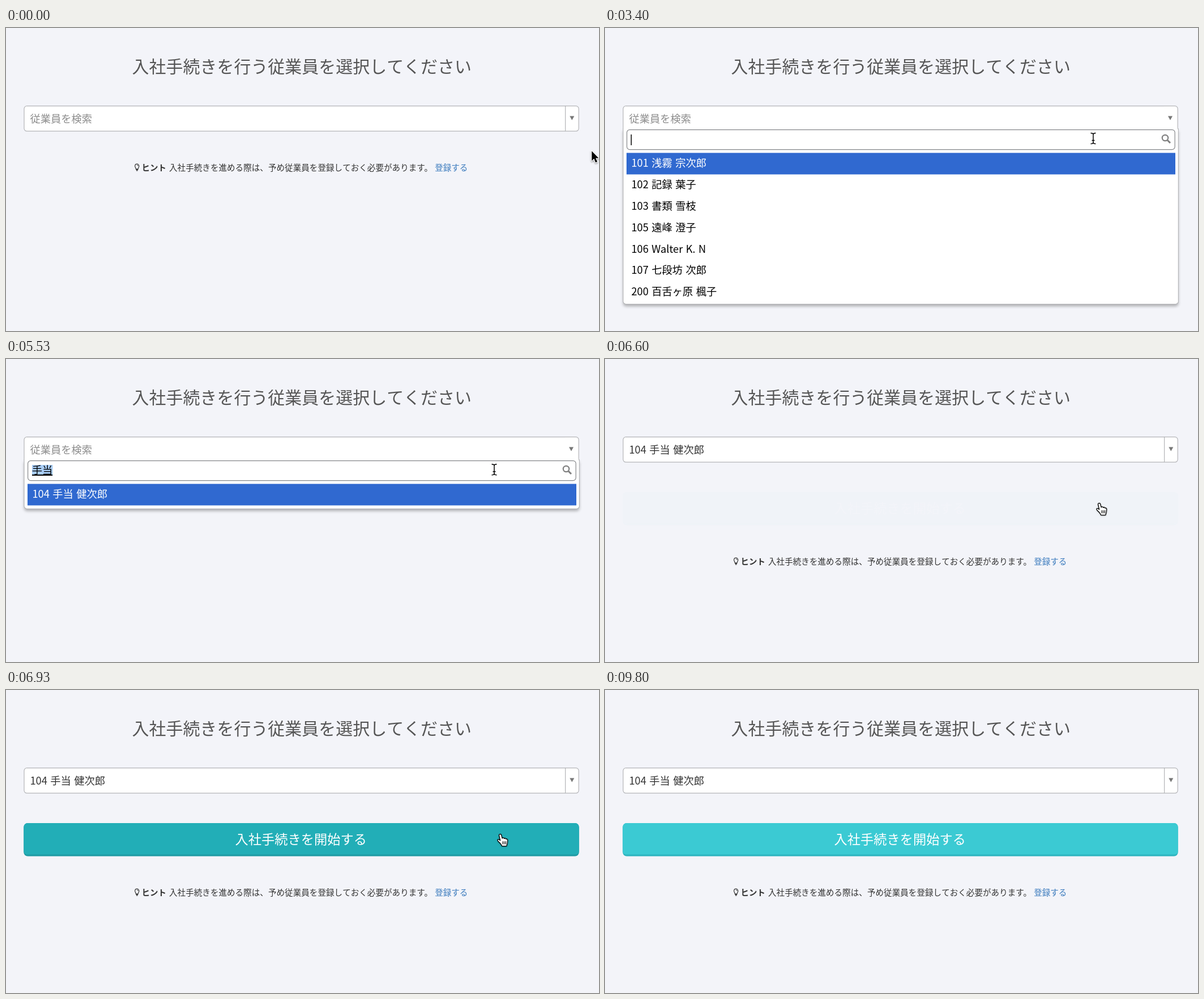
These frames come from a looping animation (1047 px wide and 535 px high, 9940 ms). An HTML page with a canvas:

```html
<!DOCTYPE html>
<html lang="ja">
<head>
<meta charset="utf-8">
<title>従業員の選択</title>
<style>
html, body { margin: 0; width: 100%; height: 100%; overflow: hidden; background: #f3f4f9; }
canvas { display: block; width: 1047px; height: 535px; }
</style>
</head>
<body>
<canvas id="stage"></canvas>
<script>
const W = 1047, H = 535, LOOP = 9940, STEP = 1000 / 15;
const FONT = '"Noto Sans CJK JP", "Noto Sans CJK", "Noto Sans", sans-serif';
const BG = [243, 244, 249];

// Key moments in ms
const OPEN = 1400, TYPE = 3800, CONVERT = 4400, FILTER = 4600, PICK = 6470;

const PEOPLE = ['101 浅霧 宗次郎', '102 記録 葉子', '103 書類 雪枝', '105 遠峰 澄子',
  '106 Walter K. N', '107 七段坊 次郎', '200 百舌ヶ原 楓子'];
const CHOSEN = '104 手当 健次郎';
const TYPED = [[TYPE, 't'], [3930, 'て'], [4060, 'てあ'], [4130, 'てあt'], [4200, 'てあて']];

// Pointer path: time, x, y
const PATH = [[0, 1034, 217], [70, 1034, 217], [470, 1000, 164], [790, 1000, 164],
  [800, 1000, 161], [1800, 1000, 161], [2670, 862, 195], [5530, 862, 195],
  [5870, 872, 275], [6130, 873, 256], [8670, 873, 256], [9400, 1054, 226], [LOOP, 1054, 226]];

const ARROW = new Path2D('M0 0V17.2L4 13.6L6.8 20.2L9.8 18.9L7 12.5H12.2Z');
const HAND = new Path2D('M-2.6 .8C-3-1.8 1-2.4 1.8 .2L3.3 6C4.6 4.4 6.8 4.9 7 6.6' +
  'C8.4 5.4 10.3 6.1 10.5 7.6C12 6.8 13.5 7.8 13.4 9.8L13 14.6L11.4 20.3H2.9' +
  'C1.6 16.6-1.6 14.2-4.6 11C-6.4 8.9-4.6 7.2-2.6 8.3L-.4 10Z');
const BEAM = new Path2D('M-4.5-9.5C-2-9.5 0-9 0-7V7C0 9-2 9.5-4.5 9.5' +
  'M4.5-9.5C2-9.5 0-9 0-7M0 7C0 9 2 9.5 4.5 9.5M-2.5 3.5H2.5');
const BULB = new Path2D('M-2 3.2C-2 1.4-4-.1-4-2.2C-4-7.4 4-7.4 4-2.2C4-.1 2 1.4 2 3.2Z' +
  'M-2 4.6H2M-1.4 6.1H1.4M.4-4.1C1.5-4 2-3.3 2.1-2.5');

const canvas = document.getElementById('stage');
const ctx = canvas.getContext('2d');
const dpr = window.devicePixelRatio || 1;
canvas.width = W * dpr;
canvas.height = H * dpr;

const clamp = v => Math.max(0, Math.min(1, v));
const ramp = (t, from, to) => clamp((t - from) / (to - from));
const ease = p => p * p * (3 - 2 * p);
const mix = (a, b, p) => a.map((v, i) => Math.round(v + (b[i] - v) * p));
const rgb = c => `rgb(${c})`;

// y is the middle of the line
function text(str, x, y, size, color, weight = 500) {
  ctx.font = `${weight} ${size}px ${FONT}`;
  ctx.wordSpacing = size > 16 ? '1.3px' : '0px';
  ctx.fillStyle = color;
  ctx.fillText(str, x, y + size * 0.375);
  return ctx.measureText(str).width;
}

function box(x, y, w, h, r, fill, stroke) {
  ctx.beginPath();
  ctx.roundRect(x, y, w, h, r);
  if (fill) {
    ctx.fillStyle = fill;
    ctx.fill();
  }
  if (stroke) {
    ctx.strokeStyle = stroke;
    ctx.lineWidth = 1.2;
    ctx.stroke();
  }
}

function rect(x, y, w, h, color) {
  ctx.fillStyle = color;
  ctx.fillRect(x, y, w, h);
}

function shadow(color, blur, dy) {
  ctx.shadowColor = color;
  ctx.shadowBlur = blur * dpr;
  ctx.shadowOffsetY = dy * dpr;
}

function field(label, color, open) {
  box(32, 137.7, 979.2, 44.5, 5, '#fff', '#b4b5b8');
  rect(35, 138.4, 952, 1, '#eeeef0');
  if (!open) rect(987, 138, 1.2, 44, '#b4b5b8');
  const x = open ? 998 : 999.3;
  ctx.beginPath();
  ctx.moveTo(x - 4, 155.5);
  ctx.lineTo(x + 4, 155.5);
  ctx.lineTo(x, 162.8);
  ctx.fillStyle = '#777';
  ctx.fill();
  text(label, 42.4, 160, 18.3, color);
}

function hint(y) {
  ctx.save();
  ctx.translate(231.3, y);
  ctx.scale(0.9, 0.95);
  ctx.strokeStyle = '#333';
  ctx.lineWidth = 1.3;
  ctx.stroke(BULB);
  ctx.restore();
  text('ヒント', 239.4, y + 0.4, 14.5, '#333', 700);
  text('入社手続きを進める際は、予め従業員を登録しておく必要があります。', 288, y + 0.4, 14.58, '#333');
  text('登録する', 757.2, y + 0.4, 14.5, '#3a7abd');
}

// Blinks once a second with soft edges
function caretAlpha(t) {
  const p = (t - OPEN) % 1000;
  return p < 870 ? 1 - ramp(p, 470, 600) : ramp(p, 870, 990);
}

function query(t) {
  if (t >= CONVERT) {
    rect(46, 187, 36.5, 19, '#a9cdf6');
    text('手当', 45.8, 196.5, 18.3, '#000');
    rect(46, 204, 36, 2, '#000');
    return;
  }
  let x = 45.6;
  const now = TYPED.filter(k => t >= k[0]).pop();
  if (now) {
    const w = text(now[1], 45.8, 196.5, 18.3, '#000');
    rect(46, 205, w, 1, '#000');
    x += w;
  }
  ctx.globalAlpha = now ? 1 : caretAlpha(t);
  rect(x, 188, 1.5, 19, '#000');
  ctx.globalAlpha = 1;
}

function dropdown(t) {
  const rows = t >= FILTER ? [CHOSEN] : PEOPLE;
  const bottom = rows.length > 1 ? 487.5 : 264.5;
  shadow('rgba(0,0,0,.28)', 5, 4);
  box(32, 178, 980.4, bottom - 178, [0, 0, 5, 5], '#fff');
  shadow('transparent', 0, 0);
  box(32, 178, 980.4, bottom - 178, [0, 0, 5, 5], null, '#b6b7ba');
  rect(32.7, 176.5, 978, 3, '#fff');

  box(38.6, 179.6, 967.6, 35, 5, '#fff', '#85878a');
  ctx.strokeStyle = '#808080';
  ctx.lineWidth = 2.2;
  ctx.beginPath();
  ctx.arc(989, 194, 5.2, 0, 7);
  ctx.stroke();
  ctx.lineWidth = 3;
  ctx.beginPath();
  ctx.moveTo(993, 198);
  ctx.lineTo(998, 203);
  ctx.stroke();
  query(t);

  rect(38, 220.5, 969, 38, '#3069d0');
  rows.forEach((name, i) => text(name, 46.4, 238.6 + i * 37.8, 18.3, i ? '#000' : '#fff'));
}

function button(t, leave) {
  const shown = ramp(t, 6600, 6900);
  if (!shown) return;
  const face = mix([34, 174, 183], [59, 202, 211], leave);
  const edge = mix([30, 155, 164], [45, 180, 191], leave);
  box(31.3, 235, 980.4, 58.5, 7, rgb(mix(BG, edge, shown)));
  box(31.3, 235, 980.4, 55.5, [7, 7, 6, 6], rgb(mix(BG, face, shown)));
  text('入社手続きを開始する', 404.6, 263.6, 23.25, rgb(mix(BG, [255, 255, 255], shown)));
}

function pointerAt(t) {
  const i = PATH.findIndex(k => t < k[0]);
  const [t0, x0, y0] = PATH[i - 1], [t1, x1, y1] = PATH[i];
  const p = ease(ramp(t, t0, t1));
  return [x0 + (x1 - x0) * p, y0 + (y1 - y0) * p];
}

function pointerKind(t, x, y) {
  if (t >= PICK) return x < 1012 && y > 235 && y < 294 ? 'hand' : 'arrow';
  if (t < OPEN || x > 1006) return 'arrow';
  if (y > 180 && y < 215) return 'beam';
  return y > 220 && y < 259 ? 'hand' : 'arrow';
}

function pointer(t) {
  const [x, y] = pointerAt(t);
  const kind = pointerKind(t, x, y);
  ctx.save();
  ctx.translate(x, y);
  ctx.lineJoin = 'round';
  if (kind === 'beam') {
    ctx.strokeStyle = '#fff';
    ctx.lineWidth = 3;
    ctx.stroke(BEAM);
    ctx.strokeStyle = '#000';
    ctx.lineWidth = 1.5;
    ctx.stroke(BEAM);
  } else if (kind === 'hand') {
    ctx.scale(0.95, 0.97);
    shadow('rgba(0,0,0,.35)', 3, 1);
    ctx.fillStyle = '#fff';
    ctx.fill(HAND);
    shadow('transparent', 0, 0);
    ctx.strokeStyle = '#000';
    ctx.lineWidth = 1.4;
    ctx.stroke(HAND);
    for (const lx of [3.8, 6.6, 9.4]) rect(lx, 11.5, 1.2, 5.5, '#000');
  } else {
    ctx.translate(0.2, 0.2);
    shadow('rgba(0,0,0,.4)', 3, 1.5);
    ctx.strokeStyle = '#fff';
    ctx.lineWidth = 2.4;
    ctx.stroke(ARROW);
    shadow('transparent', 0, 0);
    ctx.fillStyle = '#000';
    ctx.fill(ARROW);
  }
  ctx.restore();
}

function draw(t) {
  ctx.setTransform(dpr, 0, 0, dpr, 0, 0);
  rect(0, 0, W, H, rgb(BG));
  text('入社手続きを行う従業員を選択してください', 222.6, 67.8, 29.97, '#555', 400);

  const picked = t >= PICK, open = t >= OPEN && !picked;
  if (picked) field(CHOSEN, '#333', false);
  else field('従業員を検索', '#8c8c8c', open);

  if (open) dropdown(t);
  else hint(picked ? 357 : 246);
  if (picked) button(t, ramp(t, 9200, 9400));
  pointer(t);
}

const start = performance.now();
function tick() {
  const t = (performance.now() - start) % LOOP;
  // The scene advances fifteen times a second
  draw(Math.min(LOOP - 1, Math.floor((t + 5) / STEP) * STEP + 5));
  requestAnimationFrame(tick);
}
tick();
</script>
</body>
</html>
```
